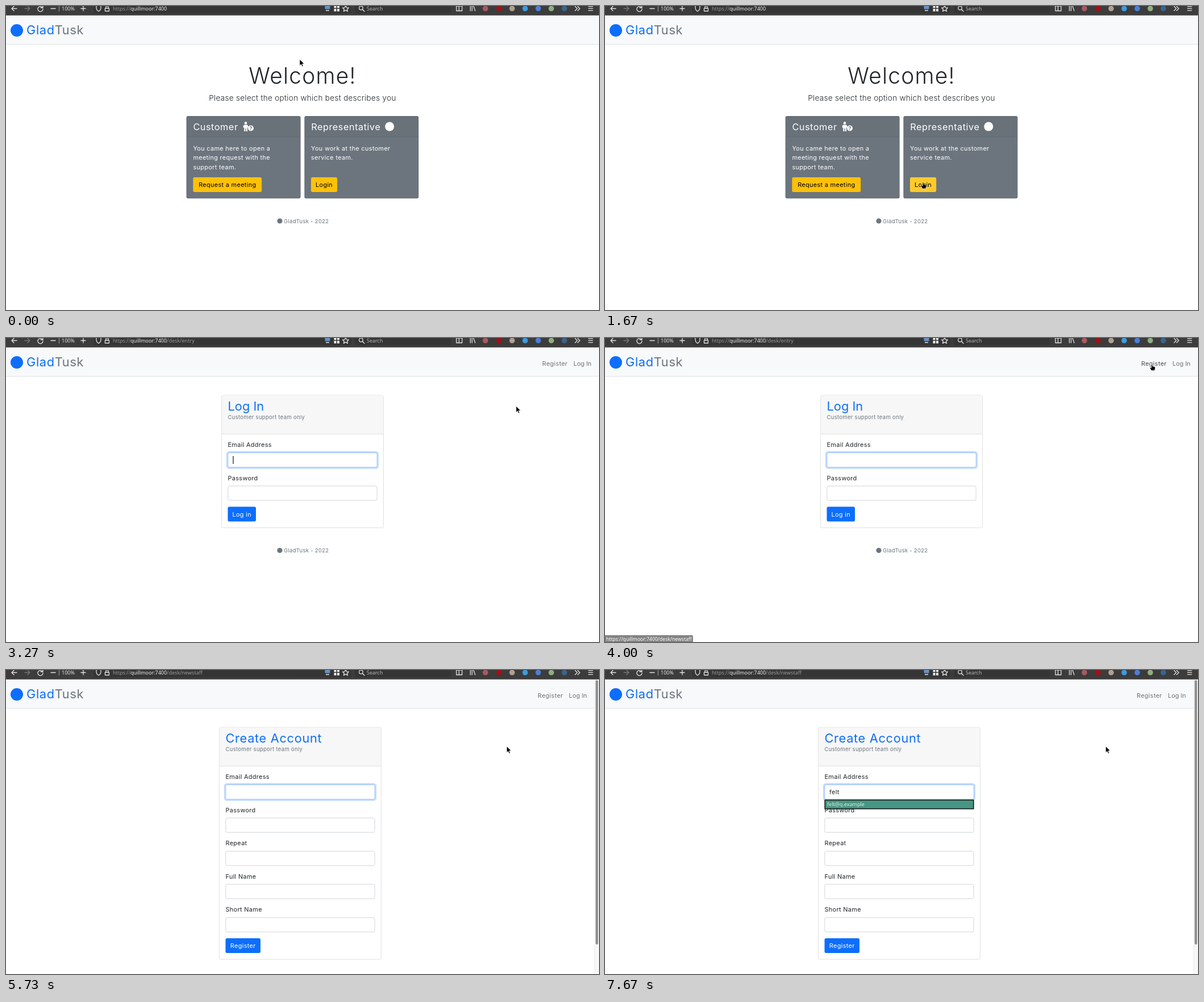
Animation of 1044x536 px, one loop 8 s. Source, as an HTML page:

```html
<!DOCTYPE html>
<html lang="en">
<head>
<meta charset="utf-8">
<title>Support desk</title>
<style>
  html, body { margin: 0; width: 100%; height: 100%; overflow: hidden; background: #fff; }
  svg { display: block; width: 100vw; height: 100vh; }
  text { font: 10.9px Inter, sans-serif; letter-spacing: .03em; white-space: pre; }
  .chrome text, .ui { font: 9px "Noto Sans", sans-serif; letter-spacing: 0; }
  .line { fill: none; stroke: #e3e3e3; stroke-width: 1.3; stroke-linecap: round; stroke-linejoin: round; }
</style>
</head>
<body>
<svg id="stage" viewBox="0 0 1044 536" preserveAspectRatio="none"></svg>
<script>
const BLUE = '#0d6efd', GRAY = '#6c757d', INK = '#212529', YELLOW = '#ffc107';
const BRAND = ['Glad', 'Tusk'], HOST = 'quillmoor:7400';
const LOGIN_PATH = '/desk/entry', REGISTER_PATH = '/desk/newstaff';

const text = (x, y, str, fill = INK, size = 10.9, extra = '', id = '') =>
  `<text ${id && `id="${id}"`} x="${x}" y="${y}" fill="${fill}" style="font-size:${size}px;${extra}">${str}</text>`;
const centered = (x, y, str, fill, size, extra = '') =>
  text(x, y, str, fill, size, 'text-anchor:middle;' + extra);
const rect = (x, y, w, h, fill, r = 0, extra = '') =>
  `<rect x="${x}" y="${y}" width="${w}" height="${h}" rx="${r}" fill="${fill}" ${extra}/>`;
const circle = (x, y, r, fill, extra = '') =>
  `<circle cx="${x}" cy="${y}" r="${r}" fill="${fill}" ${extra}/>`;
const line = (d, extra = '') => `<path class="line" d="${d}" ${extra}/>`;
const group = (id, body, extra = '') => `<g id="${id}" ${extra}>${body}</g>`;
const border = color => `stroke="${color}" stroke-width=".8"`;
const button = (x, y, w, label, fill, ink, id = '') =>
  rect(x, y, w, 25.9, fill, 2.7, id && `id="${id}"`) + centered(x + w / 2, y + 17, label, ink);

function toolbar() {
  const extensions = [[844, '#a85a60'], [868, '#a50f16'], [891, '#b0a092'], [914, '#3d9be0'],
    [937, '#4a7fd8'], [960, '#8fae80'], [983, '#39648f']];
  return rect(0, 0, 1044, 16.6, '#3c3c3c') +
    rect(154, -10, 454, 23, '#353535', 4) + rect(614, -10, 169, 23, '#353535', 4) +
    line('M19 4.5H10M14 0.5L10 4.5L14 8.5') +
    line('M33 4.5H42M38 0.5L42 4.5L38 8.5', 'opacity=".35"') +
    group('reload', line('M64 2.5A4.5 4.5 0 1 0 65 5M65 -1V3H61')) +
    group('stop', line('M57 1L64 8M64 1L57 8'), 'opacity=".45"') +
    line('M79 4.5H87M132 4.5H140M136 .5V8.5') + line('M93.5 0V9', 'opacity=".5"') +
    text(98, 7.5, '100%', '#e3e3e3', 9) +
    line('M159 -1H167V3Q167 7 163 9.5Q159 7 159 3Z') +
    line('M174.5 4H181.5V9H174.5ZM176 4V1Q178 -2 180 1V4') +
    '<text x="188" y="8" fill="#999">https://<tspan fill="#ececec">' + HOST +
    '</tspan><tspan id="path"></tspan></text>' +
    rect(561.5, -1, 9, 6.5, '#6b91c4', 1) + rect(563, 7, 6, 1.8, '#c8c8c8') +
    [577.5, 583].map(x => rect(x, -1, 4, 4.5, '#eee') + rect(x, 5, 4, 4.5, '#eee')).join('') +
    line('M598 -1L599.6 2.8L603.5 3.1L600.6 5.7L601.5 9.5L598 7.4L594.5 9.5L595.4 5.7L592.5 3.1L596.4 2.8Z') +
    circle(625, 3.5, 3.3, 'none', 'class="line"') + line('M627.6 6L631 9.5') +
    text(635, 8, 'Search', '#b5b5b5', 9) +
    line('M793 0H803V8.5H793ZM797.5 0V8.5') +
    line('M817.5 0V8.5M820.5 0V8.5M823 0L826 8.5') +
    extensions.map(([x, color]) => circle(x, 4.5, 4.8, color)).join('') +
    line('M1002 .8L1005.7 4.5L1002 8.2M1006.5 .8L1010.2 4.5L1006.5 8.2') +
    line('M1025.5 .8H1033M1025.5 4.3H1033M1025.5 7.8H1033');
}

const navbar = () => rect(0, 16, 1044, 51.5, '#f8f9fa') + rect(0, 67.2, 1044, .8, '#d9dcdf') +
  circle(19, 43, 11, BLUE) +
  `<text x="36" y="50" style="font-size:21.8px" fill="${BLUE}">${BRAND[0]}<tspan fill="${GRAY}">${BRAND[1]}</tspan></text>`;

const footer = y => circle(482, y - 3.5, 4.6, GRAY) + text(489, y, BRAND.join('') + ' - 2022', GRAY, 9.54);

const card = (x, title) =>
  rect(x, 194, 201, 145.3, '#5f666d', 3) +
  rect(x + .7, 194.7, 199.6, 143.9, GRAY, 2.4) +
  rect(x + .7, 194.7, 199.6, 36, '#697179', 2.4) + rect(x + .7, 230.7, 199.6, .7, '#5f666d') +
  text(x + 11.8, 218.5, title, '#fff', 16.35);

const paragraph = (x, lines) => lines.map((s, i) => text(x, 254.8 + i * 16.35, s, '#fff')).join('');

const welcome = () =>
  centered(522, 137, 'Welcome!', INK, 39, 'font-weight:350') +
  centered(522, 166.5, 'Please select the option which best describes you', INK, 13.6, 'font-weight:350;letter-spacing:.02em') +
  card(317.6, 'Customer') + card(525.4, 'Representative') +
  circle(422, 206.4, 2.3, '#fff') +
  '<path d="M419.5 209.5H425L427.5 214L426 215L425 213.5V221H422.8V216H421.5V221H419.3V214.5H417.7V211Z" fill="#fff"/>' +
  circle(431, 215.5, 5, '#fff') + centered(431.2, 218.7, '?', GRAY, 9, 'font-weight:700') +
  circle(675.3, 212.5, 8, '#fff') +
  paragraph(329.4, ['You came here to open a', 'meeting request with the', 'support team.']) +
  paragraph(537, ['You work at the customer', 'service team.']) +
  button(329.4, 302.1, 120.8, 'Request a meeting', YELLOW, '#000') +
  button(537, 302.1, 46.2, 'Login', YELLOW, '#000', 'enter') + footer(382.5);

// A form card whose left edge is at 379, shared by both account pages.
function form(title, labels, action, width, spacing) {
  const fields = labels.map((label, i) => {
    const y = 202.4 + i * 58.5;
    const ring = i ? '' : rect(389.2, y - 1.6, 265.6, 28.6, 'none', 4, 'stroke="#c2dbfe" stroke-width="2.7"');
    return text(390.5, y - 10, label) + ring +
      rect(390.8, y, 262.4, 25.4, '#fff', 2.7, border(i ? '#c6ccd2' : '#86b7fe'));
  }).join('');
  const bottom = 180.6 + labels.length * 58.5;
  return rect(379.5, 101, 285, bottom + 37 - 101, '#fff', 3, border('#d8d8d8')) +
    rect(379.9, 101.4, 284.2, 67.6, '#f7f7f7', 2) + rect(379.9, 168.8, 284.2, .8, '#d8d8d8') +
    text(390.5, 127.5, title, BLUE, 21.8, `letter-spacing:${spacing}em`) +
    text(390.5, 143.3, 'Customer support team only', GRAY, 9.54) +
    fields + button(390.5, bottom, width, action, BLUE, '#fff');
}

const links = () => text(944, 49, 'Register', '#717273', 10.9, '', 'registerLink') +
  text(999, 49, 'Log In', '#717273', 10.9, 'letter-spacing:0');

const scrollbar = () => rect(1036.5, 16, 7.5, 520, '#f8f8f8') + rect(1036, 16, 1, 520, '#e9eaeb') +
  rect(1038, 18, 4.5, 466, '#919191', 2.2);

const popup = () => rect(387.2, 229.3, 261.6, 15.4, '#3a3a3a', 0, 'id="choice" stroke="#1c1f1e" stroke-width="1.7"') +
  '<text class="ui" x="391" y="240.2" fill="#e4e9e7">felt@q.example</text>';

const cursor = () => group('cursor',
  '<path id="arrow" d="M0 0V11.2L2.6 8.8L4.3 12.7L6.2 11.9L4.5 8.1H8Z" fill="#000" stroke="#fff" stroke-width=".7"/>' +
  '<path id="hand" d="M-1.5 6.5V1Q-.5 -.7 .5 1V4L4 4.7Q5 5 5 6.3V8.5L4 11.5H-1.5L-4 7.5Q-3.8 5.8 -2.4 6.5Z" fill="#000" stroke="#fff" stroke-width=".6"/>');

document.getElementById('stage').innerHTML =
  rect(0, 0, 1044, 536, '#fff') + navbar() + group('links', links()) +
  group('welcome', welcome()) +
  group('login', form('Log In', ['Email Address', 'Password'], 'Log in', 49.5, 0) + footer(378)) +
  group('register', form('Create Account',
    ['Email Address', 'Password', 'Repeat', 'Full Name', 'Short Name'], 'Register', 61.5, .03),
    'transform="translate(-4 0)"') +
  text(395, 219, '', INK, 10.9, '', 'typed') +
  rect(0, 208, 1.2, 14, '#111', 0, 'id="caret"') +
  group('popup', popup()) + group('scrollbar', scrollbar()) +
  group('status', rect(-3, 524, 158, 15, '#383838', 2.5) +
    `<text class="ui" x="2" y="533.8" fill="#fff" style="font-size:8.6px">https://${HOST}${REGISTER_PATH}</text>`) +
  group('chrome', toolbar(), 'class="chrome"') + cursor();

const el = id => document.getElementById(id);
const show = (id, on) => { el(id).style.display = on ? '' : 'none'; };
const within = (n, ...spans) => spans.some(([a, b]) => n >= a && n < b);

// All steps are [tick, value...], with 15 ticks per second.
const TICKS = 120;
const pointer = [
  [0, 517, 94], [6, 517, 94], [10, 526, 140], [15, 552, 247], [19, 561, 291], [22, 561, 306], [25, 560.5, 310.5],
  [34, 560.5, 310.5], [35, 558.5, 312.5], [40, 558.5, 312.5], [41, 558, 311], [43, 670, 269], [44, 770, 231],
  [46, 822, 191], [49, 898, 120], [53, 945, 57], [55, 950, 52], [56, 957, 48], [60, 963.5, 45.8],
  [75, 963.5, 45.8], [76, 949, 53], [78, 949, 53], [79, 938, 68], [81, 900, 112], [83, 881.5, 134.5], [TICKS, 881.5, 134.5]
];
const statusFade = [[0, 0], [58, .25], [60, .62], [62, 1], [70, .25], [73, 1], [81, .62], [83, .25], [86, 0]];
const typing = [[0, ''], [94, 'f'], [96, 'fe'], [100, 'fel'], [101, 'felt']];
const stepAt = (steps, n) => steps.filter(s => s[0] <= n).pop()[1];

function pointerAt(n) {
  const next = pointer.findIndex(p => p[0] > n);
  const [t0, x0, y0] = pointer[next - 1], [t1, x1, y1] = pointer[next];
  const k = (n - t0) / (t1 - t0);
  return [x0 + (x1 - x0) * k, y0 + (y1 - y0) * k];
}

function draw(n) {
  const onLogin = within(n, [35, 70]), onRegister = n >= 70;
  show('welcome', n < 35);
  show('login', onLogin);
  show('register', onRegister);
  show('links', n >= 35);
  show('scrollbar', onRegister);
  el('links').setAttribute('transform', `translate(${onRegister ? -8 : 0} 0)`);
  el('path').textContent = onRegister ? REGISTER_PATH : onLogin ? LOGIN_PATH : '';
  el('enter').setAttribute('fill', n >= 21 ? '#ffca2c' : YELLOW);
  el('registerLink').setAttribute('fill', within(n, [55, 79]) ? '#4a4b4b' : '#717273');

  const loading = within(n, [35, 39], [66, 73]);
  show('stop', loading);
  show('reload', !loading);
  el('reload').setAttribute('opacity', within(n, [39, 41], [73, 81]) ? .45 : 1);
  el('status').setAttribute('opacity', stepAt(statusFade, n));

  const typed = stepAt(typing, n);
  el('typed').textContent = typed;
  show('caret', within(n, [35, 41], [49, 58], [66, 73], [79, 86], [94, 103]));
  const typedWidth = typed ? el('typed').getComputedTextLength() : 0;
  el('caret').setAttribute('x', (onRegister ? 395.4 : 399.4) + typedWidth);
  show('popup', n >= 96);
  el('choice').setAttribute('fill', n >= 115 ? '#459783' : '#3a3a3a');

  const hand = within(n, [21, 35], [55, 79]);
  show('hand', hand);
  show('arrow', !hand);
  el('cursor').setAttribute('transform', `translate(${pointerAt(n).join(' ')})`);
}

const start = performance.now();
function frame() {
  const elapsed = (performance.now() - start) % 8000;
  draw(Math.floor(elapsed * .015 + .07) % TICKS);
  requestAnimationFrame(frame);
}
frame();
</script>
</body>
</html>
```
